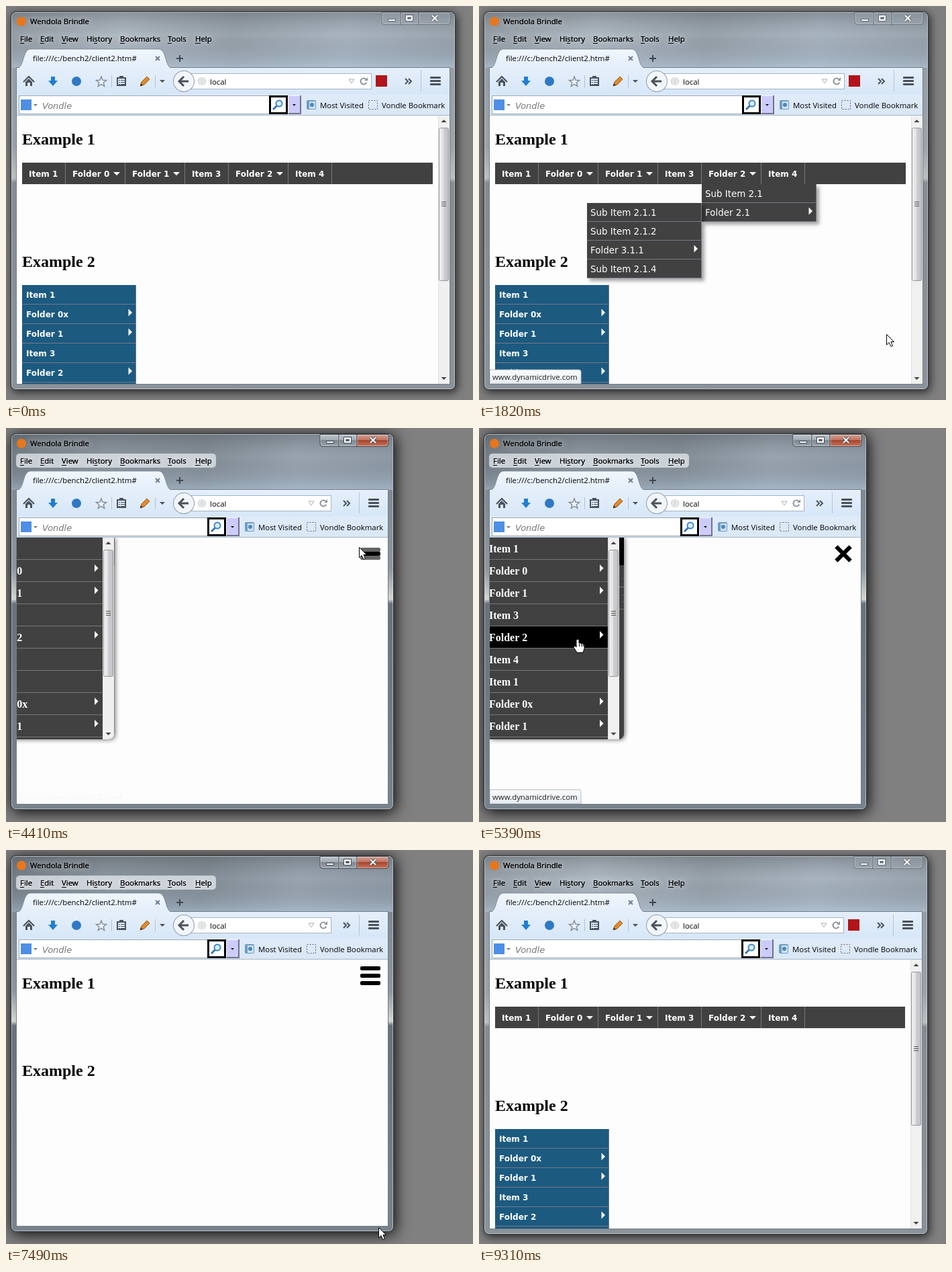
Write an HTML page with a canvas that moves like this. It is 696 px wide and 586 px high and loops after 9.38 s.

```html
<!DOCTYPE html>
<html lang="en">
<head>
<meta charset="utf-8">
<title>Responsive menu</title>
<style>
  html, body { margin: 0; width: 100%; height: 100%; overflow: hidden; background: #808080; }
  canvas { display: block; }
</style>
</head>
<body>
<canvas id="stage" width="696" height="586"></canvas>
<script>
const ctx = document.getElementById('stage').getContext('2d');
const LOOP = 9380, STEP = 70;
const UI = '11.4px "Open Sans", "Noto Sans", sans-serif';
const BOLD = 'bold 12px "DejaVu Sans", sans-serif';
const PLAIN = '13.4px "DejaVu Sans", sans-serif';
const HEAD = 'bold 24px "Liberation Serif", serif';
const LIST = 'bold 16px "Liberation Serif", serif';
const DARK = '#414141', RULE = '#777788', TOP = 163, PANEL = 200, PANEL_BOTTOM = 462;

// Time tracks: [ms, value, ...]
const widthTrack = [[2520, 669], [2730, 637], [3080, 577], [8050, 577], [8680, 668]];
const heightTrack = [[2520, 570], [2730, 567], [8050, 567], [8680, 571]];
const pointerTrack = [
  [70, 554, 559], [560, 372, 246], [980, 376, 250], [1120, 380, 306], [1610, 380, 306],
  [1820, 607, 488], [2030, 655, 562], [3290, 563, 563], [4130, 526, 177], [4550, 526, 177],
  [5180, 147, 314], [5740, 147, 314], [6020, 120, 250], [6440, 120, 250], [6860, 540, 182],
  [7210, 540, 182], [7350, 440, 330], [7490, 555, 561], [8050, 555, 561]
];

const clamp = v => Math.max(0, Math.min(1, v));
const span = (t, start, length) => clamp((t - start) / length);
const easeOut = p => 1 - Math.pow(1 - p, 2.3);
const easeInOut = p => p < .5 ? 2 * p * p : 1 - 2 * (1 - p) * (1 - p);
const within = (t, a, b) => t >= a && t < b;

function along(track, t) {
  const i = track.findIndex(k => k[0] > t);
  if (i === 0) return track[0].slice(1);
  if (i < 0) return track[track.length - 1].slice(1);
  const [a, b] = [track[i - 1], track[i]];
  const p = (t - a[0]) / (b[0] - a[0]);
  return a.slice(1).map((v, n) => v + (b[n + 1] - v) * p);
}

function rect(x, y, w, h, color) {
  ctx.fillStyle = color;
  ctx.fillRect(x, y, w, h);
}
function frame(x, y, w, h, color, line = 1) {
  ctx.strokeStyle = color;
  ctx.lineWidth = line;
  ctx.strokeRect(x + line / 2, y + line / 2, w - line, h - line);
}
function round(x, y, w, h, r, fill, stroke) {
  ctx.beginPath();
  ctx.roundRect(x, y, w, h, r);
  if (fill) { ctx.fillStyle = fill; ctx.fill(); }
  if (stroke) { ctx.strokeStyle = stroke; ctx.lineWidth = 1; ctx.stroke(); }
}
function circle(x, y, r, color) {
  ctx.beginPath();
  ctx.arc(x, y, r, 0, 7);
  ctx.fillStyle = color;
  ctx.fill();
}
function shape(points, fill, stroke, line = 1, closed = true) {
  ctx.beginPath();
  for (let i = 0; i < points.length; i += 2) ctx.lineTo(points[i], points[i + 1]);
  if (closed) ctx.closePath();
  if (fill) { ctx.fillStyle = fill; ctx.fill(); }
  if (stroke) { ctx.strokeStyle = stroke; ctx.lineWidth = line; ctx.stroke(); }
}
function text(s, x, y, font = UI, color = '#000') {
  ctx.font = font;
  ctx.fillStyle = color;
  ctx.fillText(s, x, y);
}
function gradient(y0, y1, ...stops) {
  const g = ctx.createLinearGradient(0, y0, 0, y1);
  stops.forEach(([p, c]) => g.addColorStop(p, c));
  return g;
}
const downArrow = (x, y, r, color) => shape([x - r, y, x + r, y, x, y + r], color);
const upArrow = (x, y, r, color) => shape([x - r, y + r, x + r, y + r, x, y], color);
const rightArrow = (x, y, color = '#fff') => shape([x, y - 5.5, x + 5.5, y, x, y + 5.5], color);

function clipped(x, y, w, h, draw) {
  ctx.save();
  ctx.beginPath();
  ctx.rect(x, y, w, h);
  ctx.clip();
  draw();
  ctx.restore();
}
function shadowed(color, blur, dx, dy, draw) {
  ctx.save();
  Object.assign(ctx, { shadowColor: color, shadowBlur: blur, shadowOffsetX: dx, shadowOffsetY: dy });
  draw();
  ctx.restore();
}

function drawFrame(W, H, active) {
  rect(0, 0, 696, 586, '#808080');
  const body = active
    ? gradient(9, H, [0, '#7d868e'], [.15, '#7f8992'], [.36, '#8d969d'], [.44, '#d3d6d3'], [.452, '#68727b'], [1, '#78838d'])
    : gradient(9, H, [0, '#84888c'], [.15, '#959ea7'], [.36, '#9ba2a8'], [.44, '#bcbfc0'], [.452, '#858b91'], [1, '#8b939a']);
  shadowed(active ? 'rgba(0,0,0,.95)' : 'rgba(0,0,0,.75)', active ? 22 : 14, 2, 3,
    () => round(7, 8, W - 6, H - 7, 7, '#555'));
  round(8, 9, W - 8, H - 9, 7, body);

  const glass = ctx.createLinearGradient(8, 20, W, 80);
  const stops = active
    ? ['#747d86', '#8b959e', '#838d96', '#99a4af', '#8d99a5']
    : ['#959ea6', '#aeb8c1', '#98a2ab', '#a8b4bf', '#98a3ad'];
  stops.forEach((c, i) => glass.addColorStop(i / 4, c));
  round(9, 10, W - 10, 82, [6, 6, 0, 0], glass);
  rect(9, 10, W - 10, 82, gradient(10, 92, [0, 'rgba(50,54,58,.28)'], [.4, 'rgba(90,100,110,0)'], [1, 'rgba(185,208,230,.45)']));

  round(7.5, 8.5, W - 7, H - 8, 7, null, '#2f343a');
  round(8.5, 9.5, W - 9, H - 10, 6, null, 'rgba(255,255,255,.45)');
  frame(15, 91, W - 22, H - 98, '#717d89');
  drawButtons(W, active);
}

function drawButtons(W, active) {
  const glossy = (...colors) => gradient(10, 27, ...colors.map((c, i) => [[0, .48, .5, 1][i], c]));
  const grey = glossy('#bcc4cb', '#a0a9b2', '#7d8791', '#98a3ad');
  const red = glossy('#d3a196', '#bf6f5d', '#a4452f', '#c8745a');
  const left = [0, 0, 0, 4], right = [0, 0, 4, 0];
  [[W - 109, 28, grey, left], [W - 81, 27, grey, 0], [W - 54, 47, red, right]].forEach(([x, w, fill, corner]) => {
    round(x, 9.5, w, 18, corner, active ? fill : 'rgba(170,180,190,.25)', active ? '#434b52' : 'rgba(80,88,96,.6)');
    round(x + 1, 10.5, w - 2, 16, corner, null, active ? 'rgba(255,255,255,.4)' : 'rgba(255,255,255,.3)');
  });
  const edge = active ? '#444b52' : '#636a71';
  rect(W - 100, 19, 12, 4, edge);
  rect(W - 99, 20, 10, 2, '#fff');
  frame(W - 74, 13, 12, 10, edge);
  frame(W - 73, 14, 10, 8, '#fff', 2);
  rect(W - 70, 17, 4, 2, edge);
  for (const [color, line] of [[edge, 4], ['#fff', 2.2]]) {
    shape([W - 34, 14, W - 26, 22], null, color, line, false);
    shape([W - 26, 14, W - 34, 22], null, color, line, false);
  }
}

function drawHeader(active) {
  circle(23, 23, 7, '#e8761c');
  if (active) round(15, 38, 298, 21, 5, 'rgba(233,238,243,.7)');
  const labels = () => {
    text('Wendola Brindle', 36, 27);
    [['File', 21], ['Edit', 51], ['View', 83], ['History', 120, 2], ['Bookmarks', 170], ['Tools', 241], ['Help', 282]]
      .forEach(([s, x, key = 0]) => {
        text(s, x, 53);
        const left = ctx.measureText(s.slice(0, key)).width;
        rect(Math.round(x + left), 55, Math.round(ctx.measureText(s[key]).width), 1, '#000');
      });
  };
  shadowed('rgba(255,255,255,.9)', 9, 0, 0, labels);
  labels();

  ctx.beginPath();
  ctx.moveTo(16, 93);
  ctx.bezierCurveTo(28, 91, 24, 64, 37, 64);
  ctx.lineTo(227, 64);
  ctx.bezierCurveTo(240, 64, 236, 91, 248, 93);
  ctx.fillStyle = gradient(64, 93, [0, '#f1f6fc'], [1, '#e3eefa']);
  ctx.fill();
  ctx.strokeStyle = '#7b8997';
  ctx.lineWidth = 1;
  ctx.stroke();
  text('file:///c:/bench2/client2.htm#', 40, 82);
  shape([223, 75, 229, 81], null, '#6f7f91', 2, false);
  shape([229, 75, 223, 81], null, '#6f7f91', 2, false);
  rect(254, 77, 10, 2, '#3e464e');
  rect(258, 73, 2, 10, '#3e464e');
}

function drawToolbar(W) {
  rect(16, 92, W - 24, 71, gradient(92, 163, [0, '#e5effa'], [.55, '#d7e7f8'], [.57, '#dfebf8'], [1, '#d9e7f6']));
  rect(16, 162, W - 24, 1, '#a9b7c5');
  const ink = '#4a525b';

  shape([26, 113, 34, 105, 42, 113], null, ink, 2.2, false);
  shape([29, 113, 34, 108, 39, 113, 39, 119, 36, 119, 36, 114, 32, 114, 32, 119, 29, 119], ink);
  shape([67, 105, 73, 105, 73, 111, 77, 111, 70, 119, 63, 111, 67, 111], '#1f7fd1');
  circle(105, 112, 7, '#2f79c4');
  const star = [];
  for (let i = 0; i < 10; i++) {
    const r = i % 2 ? 3.4 : 8, a = i * Math.PI / 5;
    star.push(142 + r * Math.sin(a), 113 - r * Math.cos(a));
  }
  shape(star, '#edf3fa', '#848d97', 1.4);
  rect(157, 103, 1, 18, '#b5c2d0');
  frame(165, 106, 14, 13, ink, 2);
  rect(169, 104, 6, 3, ink);
  for (let y = 110; y < 117; y += 3) { rect(168, y, 2, 1, ink); rect(171, y, 6, 1, ink); }
  shape([200, 119, 202, 113, 210, 105, 214, 109, 206, 117], '#e08a2c', '#9a5a1b');
  shape([200, 119, 201, 115, 204, 118], '#333');
  rect(222, 103, 1, 18, '#b5c2d0');
  downArrow(233, 110, 4, ink);

  const right = W < 600 ? W - 92 : W - 124;
  rect(270, 100, right - 270, 24, '#fff');
  frame(270, 100, right - 270, 24, '#a4b4c5');
  circle(265, 112, 16, '#8d9cab');
  circle(265, 112, 15, '#f2f6fb');
  shape([265, 105, 258, 112, 265, 119], null, ink, 3, false);
  rect(259, 110.5, 13, 3, ink);
  circle(292, 112, 6.5, '#dcdfe2');
  ctx.beginPath();
  ctx.ellipse(292, 112, 3, 6, 0, 0, 7);
  ctx.strokeStyle = '#f5f5f5';
  ctx.lineWidth = 1;
  ctx.stroke();
  text('local', 304, 117);
  shape([right - 34, 109, right - 26, 109, right - 30, 115], null, '#a7adb4', 1);
  ctx.beginPath();
  ctx.arc(right - 12, 112, 4.5, .4, 5.4);
  ctx.strokeStyle = '#8a939c';
  ctx.lineWidth = 2;
  ctx.stroke();
  shape([right - 11, 111, right - 6, 111, right - 6, 106], '#8a939c');

  if (W >= 600) rect(W - 118, 103, 17, 17, '#b1151b');
  for (const x of [W - 74, W - 69]) shape([x, 108, x + 4, 112, x, 116], null, ink, 2, false);
  rect(W - 51, 96, 1, 31, '#b5c2d0');
  for (let y = 105; y < 118; y += 5) round(W - 37, y, 16, 3, 1, ink);

  rect(19, 133, W - 248, 28, '#fff');
  frame(19, 133, W - 248, 28, '#9aa6b2');
  rect(22, 139, 16, 16, '#4d8fe6');
  downArrow(44, 146, 3, '#777');
  text('Vondle', 54, 153, 'italic 13px "DejaVu Sans", sans-serif', '#777');

  const b = W - 277;
  rect(b, 133, 28, 28, '#fff');
  frame(b, 133, 28, 28, '#000', 3);
  shape([b + 6, 154, b + 12, 148], null, '#3c77b5', 3, false);
  circle(b + 15, 145, 5.5, '#3d86cf');
  circle(b + 15, 145, 3.5, '#dceeff');
  rect(b + 29, 133, 19, 28, '#ccccfa');
  rect(b + 29, 133, 19, 1, '#f4f4ff');
  rect(b + 46, 133, 2, 28, '#72728c');
  rect(b + 29, 159, 19, 2, '#72728c');
  downArrow(b + 37.5, 146, 2.5, '#000');

  round(W - 221, 140, 14, 14, 2, '#6f9dc4');
  rect(W - 217, 142, 9, 11, '#cfe2f2');
  circle(W - 213, 147, 3, '#4d88b8');
  text('Most Visited', W - 201, 152);
  ctx.setLineDash([2, 2]);
  frame(W - 129, 140, 14, 14, '#666');
  ctx.setLineDash([]);
  text('Vondle Bookmark', W - 109, 152);
}

function scrollbar(x, bottom, thumbEnd) {
  rect(x, TOP, 17, bottom - TOP, '#f0f0f0');
  rect(x, TOP, 1, bottom - TOP, '#e2e2e2');
  const g = ctx.createLinearGradient(x, 0, x + 17, 0);
  ['#f5f5f5', '#e2e2e4', '#cfcfd3', '#bcbcc2'].forEach((c, i) => g.addColorStop([0, .45, .5, 1][i], c));
  round(x + 1.5, 181.5, 14, thumbEnd - 182, 2, g, '#979797');
  const mid = Math.round((181 + thumbEnd) / 2);
  for (let y = mid - 4; y <= mid + 2; y += 3) rect(x + 5, y, 7, 1, '#555');
  upArrow(x + 8.5, 169, 4, '#444');
  downArrow(x + 8.5, bottom - 10, 4, '#444');
}

function submenu(x, y, items, open, hovered) {
  if (open <= 0) return;
  const h = items.length * 28 * open;
  shadowed('rgba(0,0,0,.35)', 5, 4, 4, () => rect(x, y, 171, h, DARK));
  clipped(x, y, 171, h, () => items.forEach((s, i) => {
    const row = y + i * 28;
    if (i === hovered) rect(x, row, 171, 28, '#000');
    rect(x, row + 27, 171, 1, RULE);
    text(s, x + 5, row + 19, PLAIN, '#fff');
    if (s.startsWith('Folder')) rightArrow(x + 159.5, row + 12);
  }));
  rect(x + 170, y, 1, h, RULE);
}

const LEVEL_TWO = ['Sub Item 2.1', 'Folder 2.1'];
const LEVEL_THREE = ['Sub Item 2.1.1', 'Sub Item 2.1.2', 'Folder 3.1.1', 'Sub Item 2.1.4'];

function drawDesktopPage(t, W, H) {
  text('Example 1', 24, 206, HEAD);
  text('Example 2', 24, 388, HEAD);
  rect(24, 233, W - 57, 32, DARK);
  if (within(t, 560, 1120)) rect(332, 233, 88, 32, '#000');
  [['Item 1', 34, 88], ['Folder 0', 99, 177], ['Folder 1', 188, 266], ['Item 3', 277, 331], ['Folder 2', 342, 420], ['Item 4', 431, 485]]
    .forEach(([s, x, edge]) => {
      text(s, x, 254, BOLD, '#fff');
      rect(edge, 233, 1, 32, RULE);
      if (s.startsWith('Folder')) downArrow(edge - 12, 247, 5, '#fff');
    });
  ['Item 1', 'Folder 0x', 'Folder 1', 'Item 3', 'Folder 2', 'Item 4'].forEach((s, i) => {
    const y = 415 + i * 29;
    rect(24, y, 170, 29, RULE);
    rect(24, y, 169, 28, '#1c5a80');
    text(s, 30, y + 19, BOLD, '#fff');
    if (s.startsWith('Folder')) rightArrow(182.5, y + 12);
  });
  scrollbar(W - 25, H - 8, H - 161);
  const closing = 1 - span(t, 1960, 210);
  submenu(332, 265, LEVEL_TWO, easeInOut(span(t, 560, 280)) * closing, within(t, 1120, 1680) ? 1 : -1);
  submenu(161, 293, LEVEL_THREE, easeInOut(span(t, 1120, 280)) * closing, -1);
}

// Outer bars gather on the middle one, then cross.
function menuIcon(x, p) {
  const gather = clamp(p * 2), turn = clamp(p * 2 - 1) * Math.PI / 4;
  const bar = (dy, angle, alpha = 1) => {
    ctx.save();
    ctx.globalAlpha = alpha;
    ctx.translate(x, 187 + dy);
    ctx.rotate(angle);
    round(-15, -3, 30, 6, turn ? 0 : 2, '#000');
    ctx.restore();
  };
  const alpha = gather > 0 && gather < 1 ? .6 : 1;
  bar(-11 * (1 - gather), turn, alpha);
  bar(11 * (1 - gather), -turn, alpha);
  if (!turn) bar(0, 0);
}

function listRow(s, x, y, hot) {
  if (hot) rect(x, y, PANEL, 32, '#000');
  rect(x, y + 32, PANEL, 1, '#777');
  text(s, x + 6, y + 22, LIST, '#fff');
  if (s.startsWith('Folder')) rightArrow(x + 171, y + 12.5);
}

function subList(title, items, x, hot) {
  rect(x, TOP, PANEL, 41, '#000');
  shape([x + 13, 178, x + 7, 183.5, x + 13, 189], '#fff');
  text(title, x + 22, 189, LIST, '#fff');
  items.forEach((s, i) => listRow(s, x, 204 + i * 33, i === hot));
}

function drawMobilePage(t, W) {
  text('Example 1', 24, 206, HEAD);
  text('Example 2', 24, 336, HEAD);
  menuIcon(W - 34, span(t, 4340, 310) - span(t, 6930, 310));

  const open = easeOut(span(t, 4270, 325)) - easeOut(span(t, 6930, 280));
  if (open <= 0) return;
  const left = 16 - PANEL * (1 - open);
  const level = easeInOut(span(t, 5337, 400)) + easeInOut(span(t, 6230, 350));
  const height = PANEL_BOTTOM - TOP + 1;
  shadowed('rgba(0,0,0,.5)', 6, 2, 1, () => round(left, TOP, PANEL, height, [0, 0, 8, 0], DARK));
  ctx.save();
  ctx.beginPath();
  ctx.roundRect(left, TOP, PANEL, height, [0, 0, 8, 0]);
  ctx.clip();
  const x = Math.round(left - level * PANEL);
  ['Item 1', 'Folder 0', 'Folder 1', 'Item 3', 'Folder 2', 'Item 4', 'Item 1', 'Folder 0x', 'Folder 1', 'Item 3']
    .forEach((s, i) => listRow(s, x, TOP + i * 33, i === 4 && within(t, 5110, 5740)));
  scrollbar(x + PANEL - 17, PANEL_BOTTOM + 1, 370);
  subList('Folder 2', LEVEL_TWO, x + PANEL, within(t, 6020, 6600) ? 1 : -1);
  subList('Folder 2.1', LEVEL_THREE, x + PANEL * 2, -1);
  ctx.restore();
}

function drawStatus(s, H, alpha) {
  if (alpha <= 0) return;
  ctx.save();
  ctx.globalAlpha = alpha;
  ctx.font = UI;
  const w = Math.round(ctx.measureText(s).width) + 9, y = H - 29;
  round(16, y, w, 21, [0, 3, 0, 0], gradient(y, y + 21, [0, '#fafbfc'], [1, '#e6ebf1']), '#b4bac0');
  text(s, 20, y + 15, UI, '#222');
  ctx.restore();
}

function drawPointer(t, W, H) {
  if (t < 70 || t >= 8960) return;
  ctx.save();
  ctx.lineJoin = 'round';
  if (within(t, 2100, 3290) || t >= 7560) {
    ctx.translate(W - 13, H - 5);
    ctx.rotate(Math.PI / 4);
    shape([-11, 0, -5, -5, -5, -1, 5, -1, 5, -5, 11, 0, 5, 5, 5, 1, -5, 1, -5, 5], '#fff', '#000');
  } else {
    const [x, y] = along(pointerTrack, t);
    ctx.translate(Math.round(x), Math.round(y));
    if (within(t, 560, 1680) || within(t, 5110, 6510)) {
      shape([-2, 1, 0, 0, 2, 1, 2, 6, 5, 6, 8, 7, 10, 9, 10, 14, 8, 20, -1, 20, -6, 12, -4, 10, -2, 12], '#fff', '#000');
      for (const px of [2.5, 5.5, 8]) shape([px, 7, px, 11], null, '#000', 1, false);
    } else {
      shape([.5, .5, .5, 16, 4, 12.5, 7, 18.5, 9.5, 17.5, 7, 11.5, 11.5, 11.5], '#fff', '#000');
    }
  }
  ctx.restore();
}

function draw(t) {
  const W = Math.round(along(widthTrack, t)[0]);
  const H = Math.round(along(heightTrack, t)[0]);
  const active = within(t, 2520, 9240);
  drawFrame(W, H, active);
  drawHeader(active);
  drawToolbar(W);
  rect(16, TOP, W - 24, H - 8 - TOP, '#fdfdfd');
  clipped(16, TOP, W - 24, H - 8 - TOP, () => {
    if (W < 617) drawMobilePage(t, W);
    else drawDesktopPage(t, W, H);
    drawStatus('www.dynamicdrive.com', H, span(t, 490, 70) - span(t, 2030, 140) + span(t, 5110, 70) - span(t, 6510, 140));
    drawStatus('file:///c:/bench2/client2.htm#', H, span(t, 3990, 70) - span(t, 4270, 145));
  });
  drawPointer(t, W, H);
}

function tick() {
  const t = performance.now() % LOOP;
  draw(Math.floor(t / STEP) * STEP);
  requestAnimationFrame(tick);
}
tick();
</script>
</body>
</html>
```
